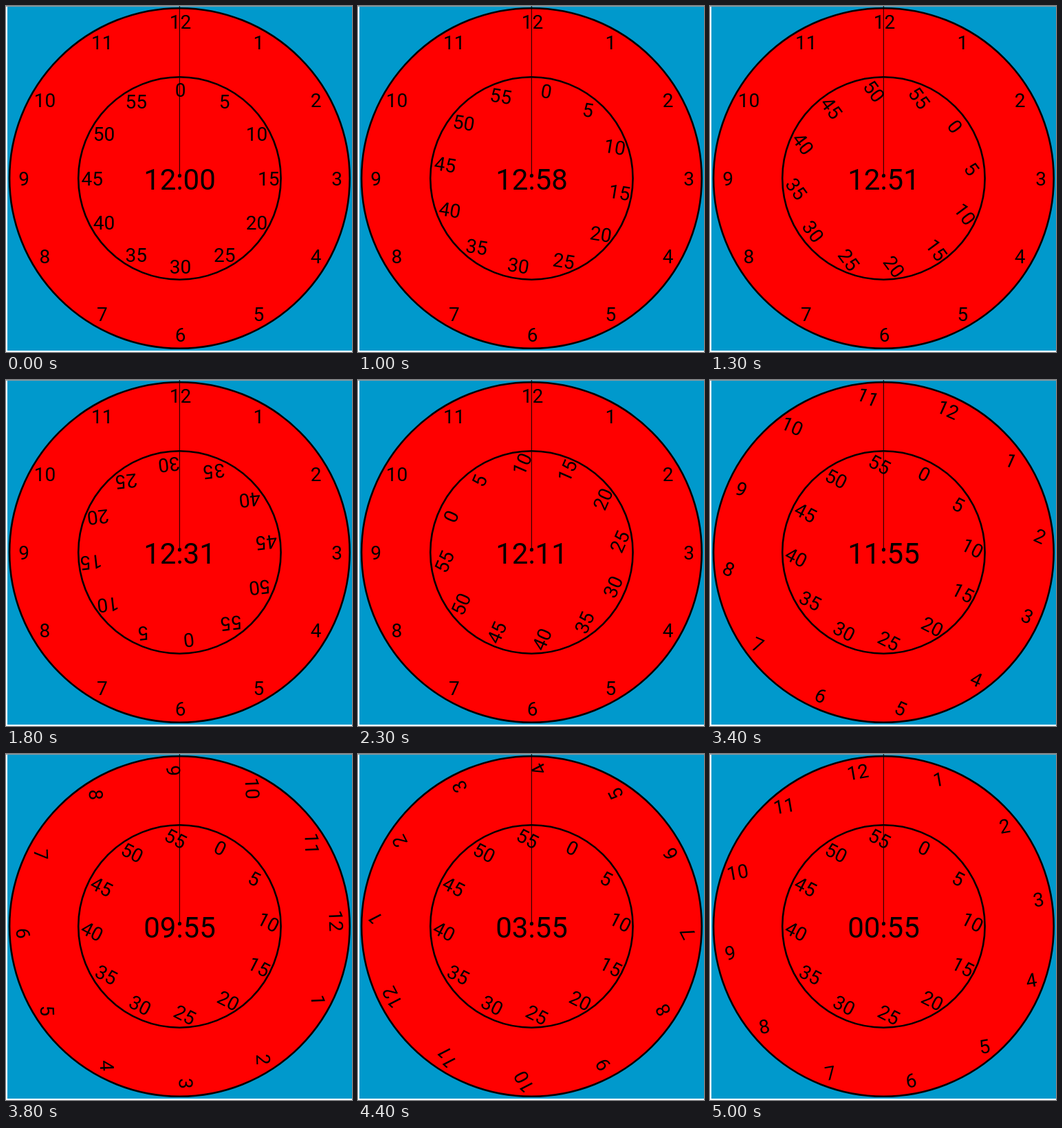
Write an HTML page that moves like this. It is 503 px wide and 503 px high and loops after 5100 ms.

```html
<!DOCTYPE html>
<html lang="en">
<head>
<meta charset="utf-8">
<title>Dial clock</title>
<style>
  html, body { margin: 0; height: 100%; overflow: hidden; background: #fff; }
  svg { display: block; width: 100%; height: 100%; }
  text { font: 28px Roboto, Arial, sans-serif; text-anchor: middle; }
  #time { font-size: 42px; }
  circle { fill: #f00; stroke: #000; stroke-width: 2.6; }
</style>
</head>
<body>
<svg viewBox="0 0 503 503">
  <rect width="503" height="1" fill="#999"/>
  <rect x="2" y="1" width="501" height="500" fill="#0099cc"/>
  <circle cx="252.4" cy="250.5" r="247.3"/>
  <g id="hours"></g>
  <circle cx="252.4" cy="250.5" r="147.2"/>
  <g id="minutes"></g>
  <text id="time" x="252.5" y="267"></text>
  <path d="M252.3 0V247" stroke="#000"/>
  <circle cx="252.3" cy="247" r="2.5" style="fill:#000;stroke:none"/>
</svg>
<script>
const LOOP = 5100, STEP = 100;
const $ = id => document.getElementById(id);

// Keys: [time in ms, angle in degrees, speed in degrees per step]
const minuteKeys = [[900, 0, 8], [1300, 53.5, 20], [2300, 293.5, 20], [2900, 387, 9]];
const hourKeys = [[3100, 0, 5], [3800, 87.7, 21], [4400, 242.7, 24], [5000, 350.2, 11]];

function addLabels(dial, radius, label) {
  for (let i = 0; i < 12; i++) {
    const a = i * Math.PI / 6;
    const text = document.createElementNS("http://www.w3.org/2000/svg", "text");
    text.setAttribute("x", 253.5 + radius * Math.sin(a));
    text.setAttribute("y", 260.5 - radius * Math.cos(a));
    text.textContent = label(i);
    dial.append(text);
  }
}

// Cubic Hermite curve through the keys, held at both ends
function angleAt(keys, t) {
  if (t <= keys[0][0]) return keys[0][1];
  const i = keys.findIndex(k => k[0] >= t);
  if (i < 0) return keys[keys.length - 1][1];
  const [t0, a0, v0] = keys[i - 1], [t1, a1, v1] = keys[i];
  const n = (t1 - t0) / STEP, u = (t - t0) / (t1 - t0), w = 1 - u;
  return a0 * w * w * (1 + 2 * u) + a1 * u * u * (3 - 2 * u)
    + n * u * w * (v0 * w - v1 * u);
}

const turn = (dial, angle) => dial.setAttribute("transform", `rotate(${angle} 252.4 250.5)`);
const reading = (angle, unit) => Math.floor((720 - angle) % 360 / unit);
const pad = n => String(n).padStart(2, "0");

function draw(now) {
  const t = Math.floor(now % LOOP / STEP) * STEP;
  const hourAngle = angleAt(hourKeys, t), minuteAngle = angleAt(minuteKeys, t);
  turn($("hours"), hourAngle);
  turn($("minutes"), minuteAngle);
  const hour = hourAngle ? reading(hourAngle, 30) : 12;
  $("time").textContent = pad(hour) + ":" + pad(reading(minuteAngle, 6));
}

addLabels($("hours"), 227.5, i => i || 12);
addLabels($("minutes"), 128.3, i => i * 5);

const start = performance.now();
function tick() {
  draw(performance.now() - start);
  requestAnimationFrame(tick);
}
tick();
</script>
</body>
</html>
```
